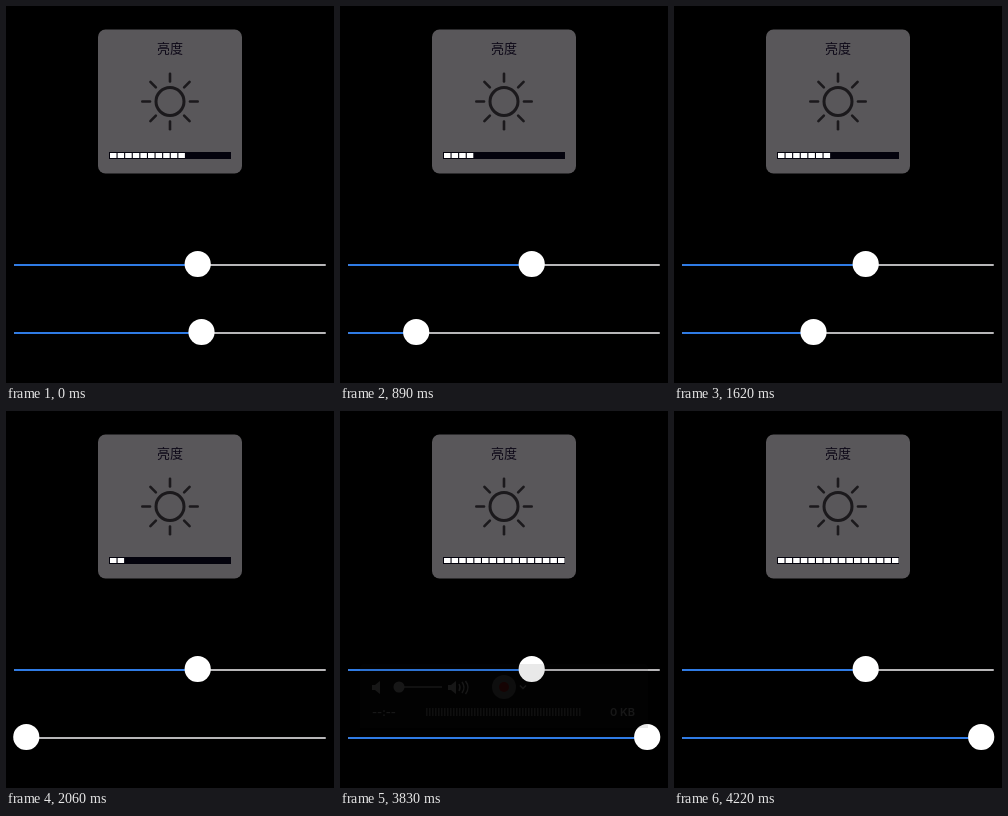
An HTML page that plays this animation: 328 by 377 pixels, repeating every 4240 ms.

```html
<!DOCTYPE html>
<html lang="zh">
<head>
<meta charset="utf-8">
<title>亮度</title>
<style>
html, body { margin: 0; width: 100%; height: 100%; overflow: hidden; background: #000; }
svg { display: block; width: 328px; height: 377px; }
.title { font: 500 13px "Noto Sans CJK SC", "Noto Sans CJK", sans-serif; fill: #0e0918; text-anchor: middle; }
.info { font: 600 11px Inter, "Open Sans", sans-serif; fill: #fff; }
</style>
</head>
<body>
<svg viewBox="0 0 328 377">
  <rect width="328" height="377"/>
  <rect x="92" y="23.5" width="144" height="144" rx="7.5" fill="#59575a"/>
  <text class="title" x="164" y="46.8">亮度</text>
  <g id="sun" transform="translate(164 95.5)" fill="none" stroke="#1b191c" stroke-width="2.6" stroke-linecap="round">
    <circle r="14" stroke-width="3"/>
  </g>
  <rect x="103" y="146" width="122" height="7" fill="#04030d"/>
  <g id="cells" fill="#fff"></g>
  <g id="sliders"></g>
  <g id="hud" opacity="0">
    <path d="M20 317V257q0-4 4-4H304q4 0 4 4V317z" fill="#1c1c1e"/>
    <g fill="#fff">
      <path id="speaker" d="M32 274h3l5-4v13l-5-4h-3z"/>
      <use href="#speaker" x="76"/>
      <circle cx="59" cy="276" r="5.5"/>
      <rect x="59" y="275.3" width="43" height="1.4"/>
    </g>
    <g fill="none" stroke="#fff" stroke-width="1.4">
      <path d="M119 273q2 3.500 0 7M122 271q4 5.500 0 11M125.500 270q5 6.500 0 13M180 274.500l3 3 3-3"/>
    </g>
    <circle cx="164" cy="276" r="12" fill="#999"/>
    <circle cx="164" cy="276" r="5" fill="#e02020"/>
    <text class="info" x="32" y="305">--:--</text>
    <text class="info" x="270" y="305">0 KB</text>
    <path d="M86 301H242" stroke="#aaa" stroke-width="8" stroke-dasharray="1.500 1.500"/>
  </g>
</svg>
<script>
const LOOP = 4240, MIN_X = 20, MAX_X = 307, CELLS = 16;

// [start time, knob position]: the drag is sampled in hard steps
const drag = [
  [0, 195.5], [440, 189], [590, 150], [740, 112], [890, 76.2], [1040, 65],
  [1180, 99], [1330, 150.5], [1470, 179], [1620, 139.5], [1770, 77],
  [1920, 33.5], [2060, 20.3], [2950, 96.7], [3100, 224], [3250, 307.2]
];
const hudFade = [[0, 0], [3830, 0.09], [3980, 0.35], [4220, 0]];

const $ = id => document.getElementById(id);

function add(parent, tag, attrs) {
  const el = document.createElementNS("http://www.w3.org/2000/svg", tag);
  for (const key in attrs) el.setAttribute(key, attrs[key]);
  return parent.appendChild(el);
}

function makeSlider(y) {
  const track = { y: y, height: 2 };
  add($("sliders"), "rect", { ...track, x: 8, width: 312, rx: 1, fill: "#b7b6b8" });
  const fill = add($("sliders"), "rect", { ...track, x: 8, rx: 1, fill: "#2f7be5" });
  const knob = add($("sliders"), "circle", { cy: y, r: 13.1, fill: "#fff" });
  return x => {
    fill.setAttribute("width", Math.max(0, x - 12 > MIN_X ? x - 8 : 0));
    knob.setAttribute("cx", x);
  };
}

for (let i = 0; i < 8; i++)
  add($("sun"), "path", { d: "M0-20V-27.700", transform: `rotate(${i * 45})` });

const cells = Array.from({ length: CELLS }, (_, i) =>
  add($("cells"), "rect", { x: 104 + i * 7.6, y: 147, width: 6.5, height: 5 }));

makeSlider(258)(191.7);
const setBrightness = makeSlider(326);

const stepAt = (steps, t) => steps.findLast(step => t >= step[0])[1];

function render(t) {
  const x = stepAt(drag, t);
  const level = Math.ceil((x - MIN_X) / (MAX_X - MIN_X) * CELLS);
  const lit = Math.min(CELLS, Math.max(2, level));
  setBrightness(x);
  cells.forEach((cell, i) => cell.setAttribute("visibility", i < lit ? "visible" : "hidden"));
  $("hud").setAttribute("opacity", stepAt(hudFade, t));
}

const start = performance.now();
function frame() {
  render((performance.now() - start) % LOOP);
  requestAnimationFrame(frame);
}
frame();
</script>
</body>
</html>
```
